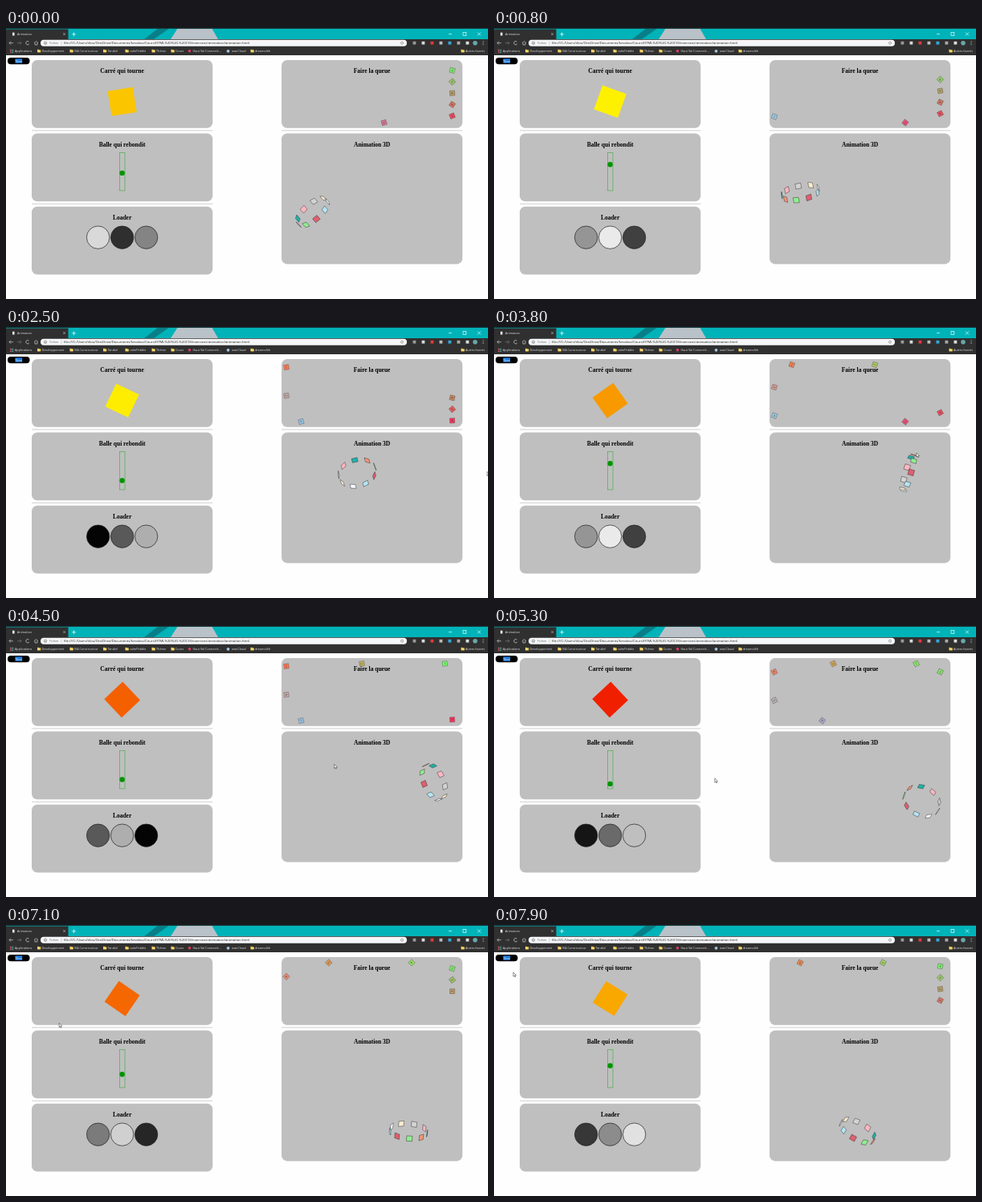
An HTML page with a canvas that plays this animation: 600x338 px, repeating every 8000 ms.

```html
<!DOCTYPE html>
<html lang="fr">
<head>
<meta charset="utf-8">
<title>Animation</title>
<style>
html, body { margin: 0; width: 100%; height: 100%; overflow: hidden; background: #fff; }
canvas, svg { position: absolute; left: 0; top: 0; width: 600px; height: 338px; display: block; }
.ui { font: 3.75px "Open Sans", "Noto Sans", sans-serif; fill: #e4e4e4; }
.url { font: 4.2px "Open Sans", "Noto Sans", sans-serif; fill: #222; }
.kind { font: 3.75px "Open Sans", "Noto Sans", sans-serif; fill: #666; }
.head { font: bold 7.5px "Liberation Serif", "Noto Serif", serif; text-anchor: middle; fill: #000; }
.pill { font: 5px "Liberation Serif", serif; fill: #fff; }
</style>
</head>
<body>
<canvas id="stage"></canvas>
<svg id="labels" viewBox="0 0 600 338"></svg>
<script>
const LOOP = 8000;
const LAP = 10;
const TAU = Math.PI * 2;
const RAD = Math.PI / 180;
const LEFT = 32, RIGHT = 343, CARD = 225.2, ROW = 91.4;
const MID = LEFT + CARD / 2;

const canvas = document.getElementById('stage');
const svg = document.getElementById('labels');
const scale = Math.max(1, window.devicePixelRatio || 1);
canvas.width = 600 * scale;
canvas.height = 338 * scale;
const ctx = canvas.getContext('2d');

const mod = (a, n) => ((a % n) + n) % n;
const mix = (a, b, u) => a + (b - a) * u;
const rgb = c => `rgb(${c.map(Math.round).join(',')})`;

function box(x, y, w, h, fill) {
  ctx.fillStyle = fill;
  ctx.fillRect(x, y, w, h);
}

function round(x, y, w, h, r, fill) {
  ctx.beginPath();
  ctx.roundRect(x, y, w, h, r);
  ctx.fillStyle = fill;
  ctx.fill();
}

function paint(fill, stroke, width) {
  if (fill) { ctx.fillStyle = fill; ctx.fill(); }
  if (stroke) { ctx.strokeStyle = stroke; ctx.lineWidth = width; ctx.stroke(); }
}

function disc(x, y, r, fill, stroke, width = 0.8) {
  ctx.beginPath();
  ctx.arc(x, y, r, 0, TAU);
  paint(fill, stroke, width);
}

function poly(points, fill, stroke, width = 0.6) {
  ctx.beginPath();
  for (const [x, y] of points) ctx.lineTo(x, y);
  ctx.closePath();
  paint(fill, stroke, width);
}

function line(color, ...points) {
  ctx.beginPath();
  for (const [x, y] of points) ctx.lineTo(x, y);
  paint(null, color, 0.7);
}

// Point on a clockwise lap around a rectangle, from its top right corner.
// ends: the time at which each of the four sides is finished.
function lap(p, ends, { l, t, r, b }) {
  const corners = [[r, t], [r, b], [l, b], [l, t]];
  const side = ends.findIndex(e => e > p);
  const from = side ? ends[side - 1] : 0;
  const u = (p - from) / (ends[side] - from);
  const a = corners[side], z = corners[(side + 1) % 4];
  return { side, u, x: mix(a[0], z[0], u), y: mix(a[1], z[1], u) };
}

// ---- text ----
function label(cls, x, y, text) {
  const el = document.createElementNS(svg.namespaceURI, 'text');
  el.setAttribute('class', cls);
  el.setAttribute('x', x);
  el.setAttribute('y', y);
  el.textContent = text;
  svg.append(el);
}

const folders = [
  [44.5, 'Developpement'], [85, 'VIA Constructeur'], [126.5, 'Tandiel'], [154, 'calmPebble'],
  [187, 'Thème'], [211, 'Cours'], [310, 'dreamolith'], [572, 'Autres favoris']
];
const sites = [[11, 'Applications'], [232.5, 'Haut Val Connecté...'], [281, 'ownCloud']];

for (const [x, text] of [...folders, ...sites]) label('ui', x, 30.2, text);
label('ui', 14, 9.3, 'Animation');
label('kind', 54, 20.1, 'Fichier');
label('url', 72, 20.2, 'file:///C:/Users/tilou/OneDrive/Documents/kreobox/Cours/HTML%20%20-%20CSS/exercices/animation/animation.html');
label('pill', 11.6, 42.6, 'Test');
['Carré qui tourne', 'Balle qui rebondit', 'Loader'].forEach((s, i) => label('head', MID, 56.1 + i * ROW, s));
['Faire la queue', 'Animation 3D'].forEach((s, i) => label('head', RIGHT + CARD / 2, 56.1 + i * ROW, s));

// ---- browser and page ----
function tabs() {
  box(0, 0, 600, 14, '#00b3b8');
  poly([[172, 14], [190, 0], [204, 0], [184, 14]], '#087f88');
  poly([[205, 14], [214, 0], [256, 0], [264, 14]], '#b9c2c8');
  box(0, 0, 600, 1, '#12383c');
  box(0, 1.5, 77.5, 12.5, '#303030');
  box(8, 5.7, 2.6, 3.8, '#e8e8e8');
  line('#ccc', [71.3, 6.3], [73.8, 8.8]);
  line('#ccc', [73.8, 6.3], [71.3, 8.8]);
  line('#fff', [82, 7.8], [87, 7.8]);
  line('#fff', [84.5, 5.3], [84.5, 10.3]);
  line('#dff', [551, 7.5], [555, 7.5]);
  line('#dff', [587, 5.5], [591, 9.5]);
  line('#dff', [591, 5.5], [587, 9.5]);
  ctx.strokeRect(569, 5.5, 3.8, 3.8);
}

function arrow(x, dir, color) {
  line(color, [x - 2.5 * dir, 18.7], [x + 2.5 * dir, 18.7]);
  line(color, [x + dir * 0.5, 16.7], [x + 2.5 * dir, 18.7], [x + dir * 0.5, 20.7]);
}

function toolbar() {
  box(0, 14, 600, 20, '#303030');
  arrow(6.5, -1, '#ccc');
  arrow(16.5, 1, '#777');
  ctx.beginPath();
  ctx.arc(27, 18.7, 2.2, 0.5, 5.4);
  paint(null, '#ccc', 0.8);
  line('#ccc', [35, 18.7], [37.5, 16.5], [40, 18.7]);
  line('#ccc', [36, 18.3], [36, 21], [39, 21], [39, 18.3]);

  round(43, 14.7, 456, 8, 4, '#f5f6f7');
  disc(49, 18.7, 1.7, null, '#666', 0.6);
  line('#666', [49, 18.3], [49, 19.8]);
  line('#bbb', [69, 16.8], [69, 20.8]);
  disc(493, 18.7, 1.5, null, '#666', 0.6);

  ['#999', '#d8d8d8', '#e03b3b', '#bbb', '#38a8d8', '#aaa', '#ddd']
    .forEach((c, i) => box(506.5 + i * 11, 16.8, 3.8, 3.8, c));
  disc(584, 18.7, 2.8, '#69a7a9');
  for (let i = 0; i < 3; i++) disc(594, 16.8 + i * 1.9, 0.5, '#ddd');

  for (let i = 0; i < 9; i++) {
    box(5 + (i % 3) * 1.6, 26.7 + Math.floor(i / 3) * 1.6, 1.1, 1.1, ['#e55', '#5b5', '#59e'][i % 3]);
  }
  for (const [x] of folders) {
    box(x - 5.5, 26.8, 2, 1, '#f2c94c');
    box(x - 5.5, 27.4, 4.2, 3, '#ffd968');
  }
  disc(228.5, 28.8, 1.8, '#e23b62');
  disc(276.5, 28.8, 1.9, '#9fc4df');
}

function card(x, row, h = 84.8) {
  const y = 40 + row * ROW;
  round(x, y, CARD, h, 7, '#bfbfbf');
  if (row) box(x, y - 4, CARD, 1, '#d0d0d0');
}

function page() {
  box(0, 34, 600, 304, '#fefefe');
  round(2, 37, 27.5, 8.2, 4, '#000');
  box(11.4, 38.2, 8.8, 5.6, '#1878d8');
  for (let i = 0; i < 3; i++) card(LEFT, i);
  card(RIGHT, 0);
  card(RIGHT, 1, 163);
}

// ---- left column ----
// Red to yellow over one full turn, then back again.
function square(t) {
  const half = 4.15;
  const x = Math.abs(mod(t - 1.6, 2 * half) - half) / half;
  const g = x + 1.1 * x * x * (1 - x);
  ctx.save();
  ctx.translate(MID, 91.8);
  ctx.rotate(-g * TAU);
  box(-15.8, -15.8, 31.6, 31.6, rgb([238 + 17 * g, 255 * g, 0]));
  ctx.restore();
}

// Steady fall, quick rebound, once a second.
function ball(t) {
  const u = mod(t - 0.59, 1), fall = 0.76;
  const n = u < fall ? u / fall : 1 - ((u - fall) / (1 - fall)) ** 3.5;
  ctx.strokeStyle = '#4fae4f';
  ctx.lineWidth = 0.7;
  ctx.strokeRect(141.4, 155.6, 6.6, 47.3);
  disc(MID, 159 + 40.5 * n, 3.2, '#009400');
}

function loader(t) {
  for (let i = 0; i < 3; i++) {
    const v = 255 * (1 - mod(t - i + 0.45, 3) / 3);
    disc(MID + (i - 1) * 30, 261.2, 14.2, rgb([v, v, v]), '#222', 0.7);
  }
}

// ---- queue ----
const tints = [[112, 255, 112], [255, 48, 92], [140, 212, 242], [255, 118, 78]];

function queue(t) {
  ctx.font = '4.2px "Liberation Serif", serif';
  ctx.textAlign = 'center';
  for (let i = 0; i < 6; i++) {
    const { side, u, x, y } = lap(mod(0.41 + t + i, LAP), [5, 6, 8, 10], { l: 349, t: 47, r: 555.5, b: 118 });
    const next = tints[(side + 1) % 4];
    ctx.save();
    ctx.translate(x, y);
    ctx.rotate(u * Math.PI);
    box(-3, -3, 6, 6, rgb(tints[side].map((v, j) => mix(v, next[j], u))));
    ctx.strokeStyle = 'rgba(70,50,50,.55)';
    ctx.lineWidth = 0.6;
    ctx.strokeRect(-3, -3, 6, 6);
    ctx.fillStyle = '#333';
    ctx.fillText(6 - i, 0, 1.4);
    ctx.restore();
  }
}

// ---- tumbling ring of panels ----
const panels = ['#f4967a', '#20b2aa', '#ffb6c1', '#d3d3d3', '#faebd0', '#f4faff', '#b4e4f4', '#de6070', '#90ee90'];

function ring(t) {
  const { x: cx, y: cy } = lap(mod(t - 4.08, LAP), [2.5, 5, 7.5, 10], { l: 381.5, t: 182, r: 532.5, b: 257 });
  const w = (t - 1.58) / LAP * TAU;
  const roll = -Math.PI / 2 * (1 - Math.cos(w));
  const q = -(0.6 + 0.2 * Math.sin(w)) * Math.sin(2 * w + 0.17);
  const spin = (97 - 97 * Math.sin(w) + 8 * Math.cos(2 * w)) * RAD;
  const lift = Math.sqrt(1 - q * q);
  const cr = Math.cos(roll), sr = Math.sin(roll);
  const place = (x, y) => [cx + x * cr - y * sr, cy + x * sr + y * cr];
  const R = 23.5, H = 3.5;
  panels
    .map((fill, i) => ({ fill, a: spin + i * TAU / panels.length }))
    .sort((m, n) => (Math.sin(m.a) - Math.sin(n.a)) * Math.sign(q))
    .forEach(({ fill, a }) => {
      const c = Math.cos(a), s = Math.sin(a);
      const corner = (u, v) => place(R * c - u * H * s, R * q * s + u * H * q * c + v * H * lift);
      poly([corner(-1, -1), corner(1, -1), corner(1, 1), corner(-1, 1)], fill, 'rgba(40,40,40,.75)');
    });
}

// ---- pointer: a few stops as time, x, y ----
const stops = [[0.9, 593, 250], [1.6, 514, 216], [2.5, 599, 180.5], [3.8, 526, 157], [5.3, 275, 190], [6.3, 108.5, 186], [7.9, 24, 59]];

function pointer(t) {
  if (t < stops[0][0]) return;
  const i = Math.max(1, stops.findIndex(s => s[0] >= t));
  const done = t > stops[stops.length - 1][0];
  const a = stops[i - 1], b = done ? a : stops[i];
  const last = stops[stops.length - 1];
  const u = done ? 0 : (t - a[0]) / (b[0] - a[0]);
  const x = done ? last[1] : mix(a[1], b[1], u);
  const y = done ? last[2] : mix(a[2], b[2], u);
  const shape = [[0, 0], [0, 5.2], [1.2, 4.1], [2, 5.8], [2.8, 5.4], [2, 3.8], [3.6, 3.7]];
  poly(shape.map(([dx, dy]) => [x + dx, y + dy]), '#fff', '#222', 0.5);
}

function draw(now) {
  const t = mod(now, LOOP) / 1000;
  ctx.setTransform(scale, 0, 0, scale, 0, 0);
  tabs();
  toolbar();
  page();
  for (const part of [square, ball, loader, queue, ring, pointer]) part(t);
}

const start = performance.now();
function tick() {
  draw(performance.now() - start);
  requestAnimationFrame(tick);
}
tick();
</script>
</body>
</html>
```
